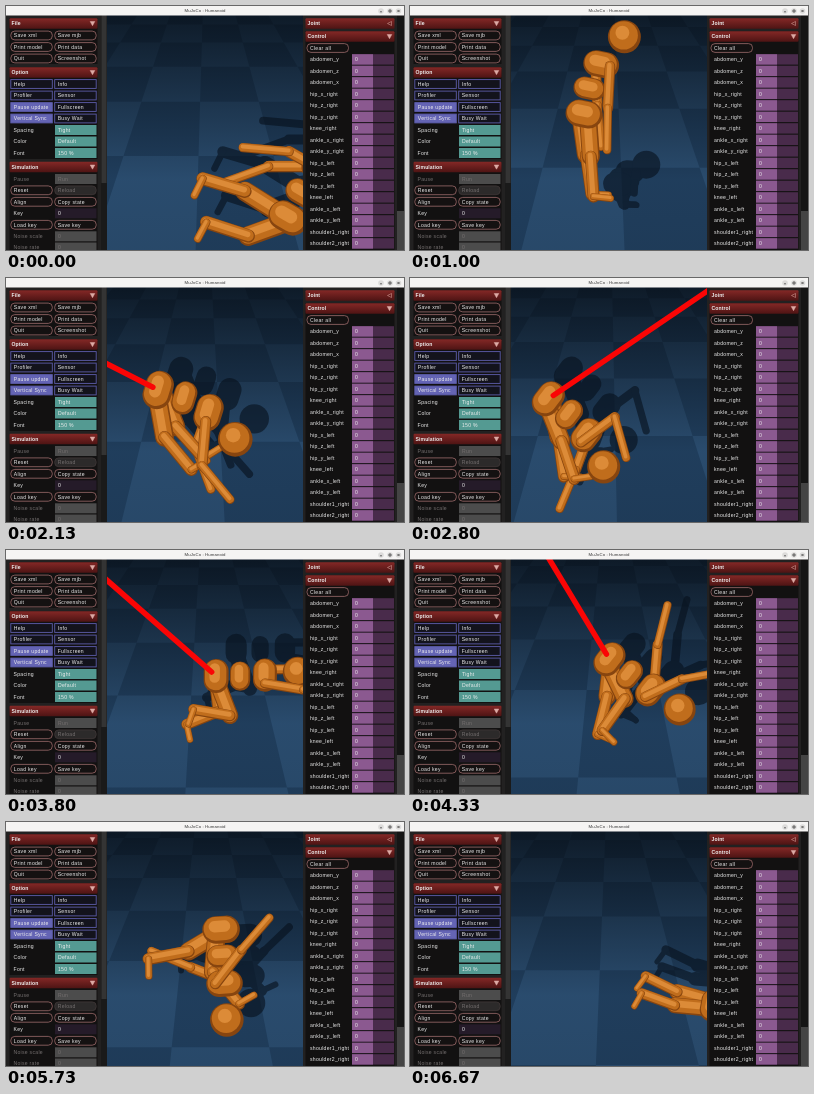
An HTML page for the animation above (6.74 s loop, 398 by 244 pixels).

```html
<!DOCTYPE html>
<html lang="en">
<head>
<meta charset="utf-8">
<title>MuJoCo : Humanoid</title>
<style>
html, body { margin: 0; width: 100%; height: 100%; overflow: hidden; background: #111; }
svg { display: block; width: 100%; height: 100%; }
text { font: 5.1px "Liberation Sans", Arial, sans-serif; letter-spacing: .28px; fill: #eee; }
.head { font-weight: bold; letter-spacing: .1px; }
.off { fill: #757070; }
.title { font-size: 4.3px; letter-spacing: .1px; fill: #333; text-anchor: middle; }
line { stroke-linecap: round; }
</style>
</head>
<body>
<svg id="stage" viewBox="0 0 398 244">
  <defs>
    <clipPath id="view"><rect x="101" y="9" width="196" height="235"/></clipPath>
    <linearGradient id="dusk" x1="0" y1="0" x2="0" y2="1">
      <stop offset="0" stop-color="#04090f" stop-opacity=".78"/>
      <stop offset=".35" stop-color="#04090f" stop-opacity=".48"/>
      <stop offset=".7" stop-color="#04090f" stop-opacity=".18"/>
      <stop offset="1" stop-color="#04090f" stop-opacity=".22"/>
    </linearGradient>
    <linearGradient id="bar" x1="0" y1="0" x2="0" y2="1">
      <stop offset="0" stop-color="#842826"/>
      <stop offset="1" stop-color="#4e1414"/>
    </linearGradient>
  </defs>
</svg>
<script>
const stage = document.getElementById('stage');
const LOOP = 6740, STEP = LOOP / 101;

function set(node, attrs) {
  for (const k in attrs) node.setAttribute(k, attrs[k]);
}
function add(tag, attrs, parent = stage) {
  const node = document.createElementNS('http://www.w3.org/2000/svg', tag);
  set(node, attrs);
  return parent.appendChild(node);
}
function rect(x, y, width, height, fill, more = {}, parent = stage) {
  return add('rect', { x, y, width, height, fill, ...more }, parent);
}
function label(x, y, str, cls = '') {
  add('text', { x, y: y + 1.7, class: cls }).textContent = str;
}

// ---------- scene ----------
const view = add('g', { 'clip-path': 'url(#view)' });
rect(101, 9, 196, 235, '#26496d', {}, view);
const tiles = add('path', { fill: '#325a82' }, view);
rect(101, 9, 196, 235, 'url(#dusk)', {}, view);
const shadows = add('g', { stroke: '#07111d', opacity: .62 }, view);
const body = add('g', {}, view);
const rope = add('line', { stroke: '#fa0505', 'stroke-width': 5.5 }, view);

const TONES = [['#87450f', 1, 0], ['#c06d1c', .86, .04], ['#dc8b38', .42, .12]];
const parts = Array.from({ length: 14 }, () => ({
  shadow: add('line', {}, shadows),
  coats: TONES.map(([stroke]) => add('line', { stroke }, body))
}));

// Angles in degrees, clockwise from the right. legs and arms: turn of the far limb.
// air: how far the figure hangs above the floor.
const lying = { x: 282, y: 212, size: 1.1, lean: -60, curl: 8, hip: 160, knee: 38, legs: 52,
  arm: 210, elbow: -25, arms: -30, pull: -150, air: 0 };
const standing = { x: 174, y: 108, size: 1, lean: -78, curl: 14, hip: 86, knee: 0, legs: -4,
  arm: 93, elbow: -2, arms: -6, pull: -150, air: 1 };
const bent = { x: 152, y: 112, size: 1.05, lean: 18, curl: 14, hip: 80, knee: -30, legs: -12,
  arm: 95, elbow: -45, arms: 15, pull: -153, air: .1 };
const dragged = { x: 138, y: 121, size: 1, lean: 38, curl: 12, hip: 68, knee: 4, legs: 12,
  arm: -40, elbow: 115, arms: 150, pull: -31, air: 0 };
const kneeling = { x: 211, y: 126, size: .92, lean: 0, curl: -3, hip: 69, knee: 122, legs: 14,
  arm: 10, elbow: 20, arms: -12, pull: -140, air: 0 };
const hanging = { x: 174, y: 72, size: 1.08, lean: 122, curl: 0, hip: 53, knee: -73, legs: 74,
  arm: -105, elbow: 5, arms: -165, pull: -79, air: .5 };
const leaving = { x: 303, y: 184, size: .88, lean: 10, curl: 0, hip: 186, knee: 15, legs: 10,
  arm: 60, elbow: 0, arms: 20, pull: -79, air: 0 };

const keys = [
  [0, lying], [400, lying], [400, standing], [1080, standing], [2130, bent],
  [2800, dragged], [3800, kneeling], [5070, hanging], [6670, leaving], [LOOP, leaving]
];

function poseAt(t) {
  let i = keys.length - 2;
  while (keys[i][0] > t) i--;
  const [t0, a] = keys[i], [t1, b] = keys[i + 1];
  const f = (t - t0) / (t1 - t0), e = f * f * (3 - 2 * f);
  const p = {};
  for (const k in a) p[k] = a[k] + (b[k] - a[k]) * e;
  return p;
}

function move([x, y], deg, dist) {
  const a = deg * Math.PI / 180;
  return [x + dist * Math.cos(a), y + dist * Math.sin(a)];
}

function leg(hip, angle, bend, s) {
  const shin = angle + bend;
  const knee = move(hip, angle, 42 * s), ankle = move(knee, shin, 40 * s);
  return [[hip, knee, 18 * s], [knee, ankle, 12 * s], [ankle, move(ankle, shin - 80, 17 * s), 7 * s]];
}
function arm(shoulder, angle, bend, s) {
  const elbow = move(shoulder, angle, 42 * s);
  return [[shoulder, elbow, 10.5 * s], [elbow, move(elbow, angle + bend, 42 * s), 8.5 * s]];
}

// Capsules from back to front: [end, end, width]
function figure(p) {
  const s = p.size, pelvis = [p.x, p.y];
  const belly = move(pelvis, p.lean, 26 * s);
  const chest = move(belly, p.lean + p.curl, 27 * s);
  const head = move(chest, p.lean + 2 * p.curl, 36 * s);
  const side = (q, d) => move(q, p.lean + 90, d * s);
  const slab = (q, w) => [side(q, -5), side(q, 5), w * s];
  // A limb spread far from its twin bends the other way.
  const farKnee = p.knee * (1 - Math.abs(p.legs) / 37);
  const farElbow = p.elbow * (1 - Math.abs(p.arms) / 150);
  return [
    ...arm(side(chest, -6), p.arm + p.arms, farElbow, s),
    ...leg(side(pelvis, -4), p.hip + p.legs, farKnee, s),
    ...leg(side(pelvis, 4), p.hip, p.knee, s),
    slab(belly, 22), slab(chest, 26), [head, head, 33 * s], slab(pelvis, 27),
    ...arm(side(chest, 9), p.arm, p.elbow, s)
  ];
}

function drawFloor(ox, oy) {
  const at = (u, v) => {
    const d = 900 / v;
    return (200 + .3 * u * d).toFixed(1) + ' ' + (d - 100).toFixed(1);
  };
  let d = '';
  for (let r = 1; r < 9; r++) for (let c = -5 + (r & 1); c < 5; c += 2) {
    const u = c + ox, v = r + oy;
    d += `M${at(u, v)}L${at(u + 1, v)}L${at(u + 1, v + 1)}L${at(u, v + 1)}Z`;
  }
  set(tiles, { d });
}

function place(line, a, b, width, up = 0) {
  set(line, { x1: a[0] - up / 2, y1: a[1] - up, x2: b[0] - up / 2, y2: b[1] - up,
    'stroke-width': width });
}

function render(t) {
  const p = poseAt(t);
  const cast = ([x, y]) => [
    p.x + 20 + 14 * p.air + (x - p.x) * (1 - .3 * p.air),
    p.y - 27 + 97 * p.air + (y - p.y) * (1 - .75 * p.air)
  ];
  figure(p).forEach(([a, b, w], i) => {
    place(parts[i].shadow, cast(a), cast(b), w * .85);
    parts[i].coats.forEach((c, k) => place(c, a, b, w * TONES[k][1], w * TONES[k][2]));
  });

  const phase = 2 * Math.PI * t / LOOP;
  drawFloor(-.1 + .3 * Math.sin(phase), .6 - .2 * Math.sin(phase));

  const grip = move([p.x, p.y], p.pull, 6);
  set(rope, {
    x1: grip[0], y1: grip[1],
    x2: move(grip, p.pull, 300)[0], y2: move(grip, p.pull, 300)[1],
    visibility: t > 1500 && t < 5500 ? 'visible' : 'hidden'
  });
}

// ---------- interface ----------
const ROW = 11.5;

function header(x, y, w, name, open = true) {
  rect(x, y - 5.2, w, 10.4, 'url(#bar)', { rx: 1 });
  label(x + 2, y, name, 'head');
  const tx = x + w - 5;
  add('path', { d: open ? `M${tx - 2.3} ${y - 2}h4.6l-2.3 4.2z` : `M${tx + 2} ${y - 2}v4l-4 -2z`,
    fill: open ? '#dcaaa5' : 'none', stroke: '#dcaaa5', 'stroke-width': .5 });
}
function button(x, y, name, off) {
  rect(x, y - 4.4, 41.5, 8.8, off ? '#2c2a2a' : '#141111',
    { rx: 4, stroke: off ? '#403838' : '#9c6a6a', 'stroke-width': .8 });
  label(x + 3, y, name, off ? 'off' : '');
}
function check(x, y, name, on) {
  rect(x, y - 4.4, 41.5, 8.8, on ? '#6464b4' : '#13131c',
    { stroke: '#5c5caa', 'stroke-width': .9 });
  label(x + 3, y, name);
}
function field(y, name, value, fill, off) {
  label(7.5, y, name, off ? 'off' : '');
  rect(49, y - 5, 41.5, 10, fill);
  label(52, y, value, off ? 'off' : '');
}
function pairs(draw, y, rows) {
  rows.forEach(([a, b, flagA, flagB = flagA], i) => {
    draw(4.8, y + i * ROW, a, flagA);
    draw(48.7, y + i * ROW, b, flagB);
  });
}

rect(0, 9, 101, 235, '#222121');
rect(297, 9, 101, 235, '#222121');
rect(95, 9, 6, 235, '#1a1a1a');
rect(95.5, 9, 5, 168, '#343434');
rect(391, 9, 7, 196, '#151515');
rect(391, 205, 7, 39, '#444');
for (const [y, h] of [[12, 46], [61, 92], [156, 88]]) rect(3.5, y, 88, h, '#121111');
rect(299.5, 25, 89, 219, '#121111');

header(3.5, 17.5, 88, 'File');
pairs(button, 29.5, [['Save xml', 'Save mjb'], ['Print model', 'Print data'], ['Quit', 'Screenshot']]);

header(3.5, 66.5, 88, 'Option');
pairs(check, 78, [['Help', 'Info'], ['Profiler', 'Sensor'],
  ['Pause update', 'Fullscreen', true, false], ['Vertical Sync', 'Busy Wait', true, false]]);
[['Spacing', 'Tight'], ['Color', 'Default'], ['Font', '150 %']].forEach(([a, b], i) =>
  field(124 + i * ROW, a, b, '#549a92'));

header(3.5, 161, 88, 'Simulation');
field(173, 'Pause', 'Run', '#4c4c4c', true);
pairs(button, 184.3, [['Reset', 'Reload', false, true], ['Align', 'Copy state']]);
field(207.3, 'Key', '0', '#251b29');
pairs(button, 218.8, [['Load key', 'Save key']]);
field(230.3, 'Noise scale', '0', '#4c4c4c', true);
field(241.5, 'Noise rate', '0', '#4c4c4c', true);

header(299.5, 17.5, 89, 'Joint', false);
header(299.5, 30.5, 89, 'Control');
button(301, 42, 'Clear all');
const legJoints = side =>
  ['hip_x', 'hip_z', 'hip_y', 'knee', 'ankle_x', 'ankle_y'].map(j => `${j}_${side}`);
const joints = ['abdomen_y', 'abdomen_z', 'abdomen_x', ...legJoints('right'), ...legJoints('left'),
  'shoulder1_right', 'shoulder2_right'];
joints.forEach((name, i) => {
  const y = 53.4 + i * ROW;
  label(304, y, name);
  rect(346, y - 5.2, 42, 10.4, '#492b4b');
  rect(346, y - 5.2, 21, 10.4, '#8b5990');
  label(349, y, '0');
});

rect(0, 0, 398, 9.5, '#f5f4f3');
add('text', { x: 199, y: 6.3, class: 'title' }).textContent = 'MuJoCo : Humanoid';
for (const cx of [375, 384, 392.5]) add('circle', { cx, cy: 5, r: 2.8, fill: '#dcdbda' });
add('path', { d: 'M374 5.8h2M383 4h2v2h-2zM391.5 4l2 2m0 -2l-2 2',
  fill: 'none', stroke: '#333', 'stroke-width': .7 });

const start = performance.now();
function tick(now) {
  const t = Math.max(0, now - start) % LOOP;
  render(Math.floor(t / STEP + .02) * STEP % LOOP);
  requestAnimationFrame(tick);
}
render(0);
requestAnimationFrame(tick);
</script>
</body>
</html>
```
